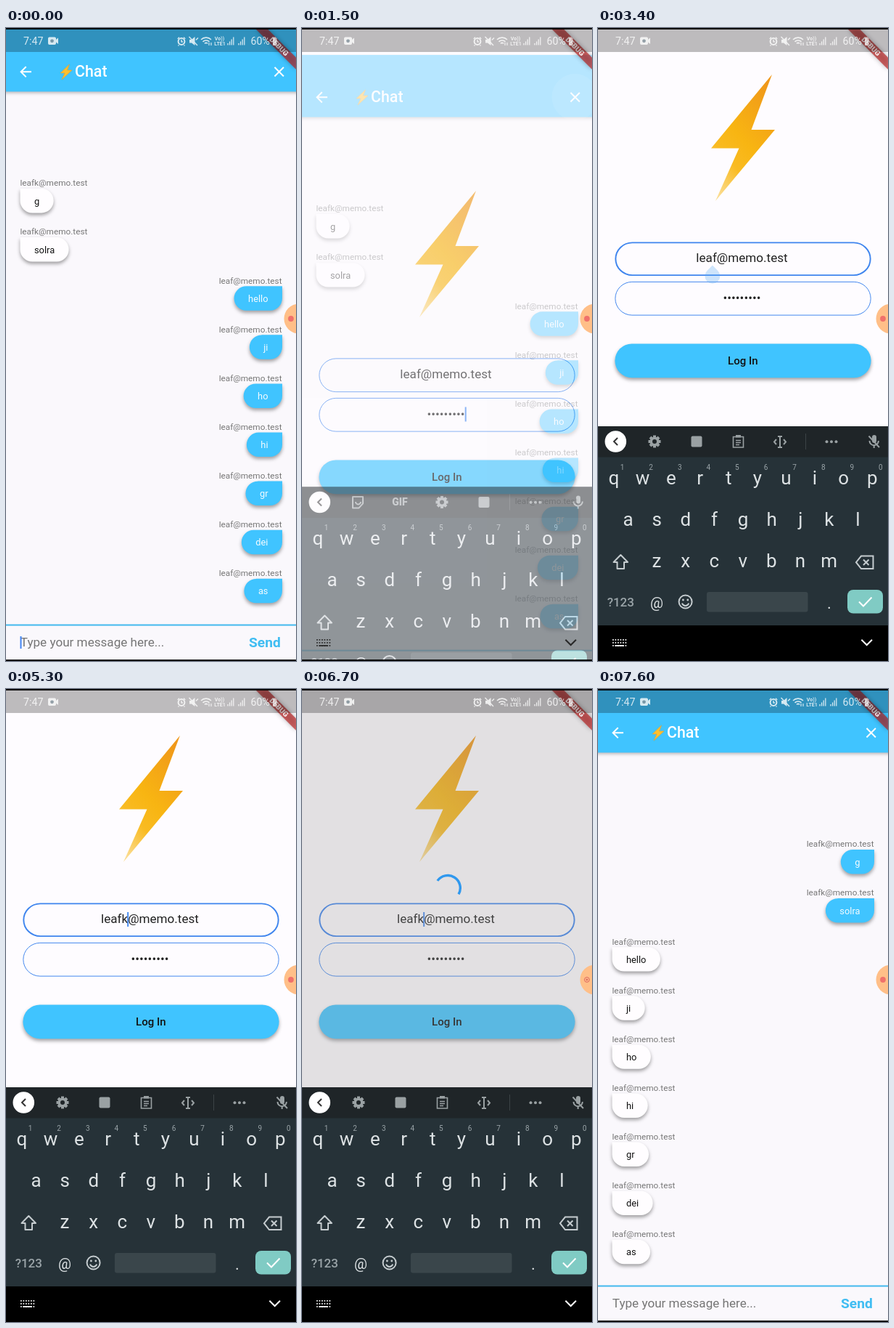
An HTML page for the animation above (8000 ms loop, 400 px wide and 871 px high).

```html
<!DOCTYPE html>
<html lang="en">
<head>
<meta charset="utf-8">
<title>Chat login</title>
<style>
html, body { margin: 0; height: 100%; overflow: hidden; background: #000; }
svg { display: block; width: 100vw; height: 100vh; font-family: Roboto, sans-serif; }
.drop { filter: drop-shadow(0 3.5px 2.8px rgba(0,0,0,.36)); }
.bar { filter: drop-shadow(0 2px 2px rgba(0,0,0,.26)); }
.line { fill: none; stroke-width: 2; }
</style>
</head>
<body>
<svg id="stage" viewBox="0 0 400 871" xmlns="http://www.w3.org/2000/svg"></svg>
<script>
const LOOP = 8000, BLUE = '#40c4ff', EDGE = '#3f85ee';
const USER_A = 'leaf@memo.test', USER_B = 'leafk@memo.test';
const MESSAGES = ['g', 'solra', 'hello', 'ji', 'ho', 'hi', 'gr', 'dei', 'as'];
const BOLT = '240,64 156,165.5 194.5,165.5 162,238 244,140 211.5,140';
const PILL = { x: 23.35, w: 353.3, h: 46.7 };

const $ = id => document.getElementById(id);
const clamp = v => Math.max(0, Math.min(1, v));
const ramp = (t, from, to) => clamp((t - from) / (to - from));
const within = (t, a, b) => t >= a && t < b;
const set = (id, attr, value) => $(id).setAttribute(attr, value);
const show = (id, on) => set(id, 'visibility', on ? 'inherit' : 'hidden');

const pen = document.createElement('canvas').getContext('2d');
function textWidth(s, size) {
  pen.font = `${size}px Roboto, sans-serif`;
  return pen.measureText(s).width;
}

function bezier(x1, y1, x2, y2) {
  const at = (a, b, s) => 3 * a * s * (1 - s) ** 2 + 3 * b * s * s * (1 - s) + s ** 3;
  return x => {
    let lo = 0, hi = 1;
    for (let i = 0; i < 22; i++) {
      const mid = (lo + hi) / 2;
      if (at(x1, x2, mid) < x) lo = mid; else hi = mid;
    }
    return at(y1, y2, (lo + hi) / 2);
  };
}
const easeIn = bezier(.42, 0, 1, 1), slowIn = bezier(.4, 0, .2, 1);

const text = (x, y, s, size, attrs = '') => `<text x="${x}" y="${y}" font-size="${size}" ${attrs}>${s}</text>`;
const rect = (x, y, w, h, fill, attrs = '') => `<rect x="${x}" y="${y}" width="${w}" height="${h}" fill="${fill}" ${attrs}/>`;
const path = (d, stroke, attrs = '') => `<path class="line" d="${d}" stroke="${stroke}" ${attrs}/>`;
const group = (id, body, attrs = '') => `<g id="${id}" ${attrs}>${body}</g>`;
const mid = 'text-anchor="middle"';

function bubble(s, i, own, name) {
  const top = 221 + 67.1 * i, w = textWidth(s, 12.84) + 39, h = 33.5, r = 16.7;
  const x = own ? 381 - w : 19.5;
  const shape = own
    ? `M${x + r} ${top}H381V${top + h - r}a${r} ${r} 0 0 1 ${-r} ${r}H${x + r}a${r} ${r} 0 0 1 0 ${-2 * r}Z`
    : `M${x} ${top}H${x + w - r}a${r} ${r} 0 0 1 0 ${2 * r}H${x + r}a${r} ${r} 0 0 1 ${-r} ${-r}Z`;
  return text(own ? 380.5 : 19.5, top - 3.7, name, 11.77, `fill="#777" text-anchor="${own ? 'end' : 'start'}"`) +
    `<path class="drop" d="${shape}" fill="${own ? BLUE : '#fffdff'}"/>` +
    text(x + 19.5, top + 21.5, s, 12.84, `fill="${own ? '#f4fbff' : '#111'}"`);
}

function chatPage(id, me) {
  const rows = MESSAGES.map((s, i) => {
    const name = i < 2 ? USER_B : USER_A;
    return bubble(s, i, name === me, name);
  }).join('');
  return group(id,
    rect(0, 2, 400, 867, '#faf8fc') + rows +
    rect(-10, 2, 420, 85.5, BLUE, 'class="bar"') +
    path('M35 60.3H21M27.7 53.2L20.6 60.3L27.7 67.4', '#fff') +
    '<polygon points="87.5,50 75,62 81,62 77,71 91,58 84.5,58" fill="#fdc02f" stroke="#e59a2c" stroke-width=".6"/>' +
    text(95, 67.3, 'Chat', 21.4, 'font-weight="500" fill="#fff"') +
    path('M370.5 54L383 66.5M383 54L370.5 66.5', '#fff') +
    `<circle id="${id}Tap" cx="376.5" cy="60" fill="#fff"/>` +
    rect(0, 820.5, 400, 2, '#43b9ee') +
    text(19.8, 851, 'Type your message here...', 17.12, 'fill="#757575"') +
    text(335, 852, 'Send', 19.26, 'font-weight="700" fill="#40bdf2"') +
    rect(19.5, 837, 2, 17, '#4285f4', `id="${id}Caret"`));
}

const field = id => rect(0, 0, 0, 0, 'none', `id="${id}" rx="23" stroke="${EDGE}"`);
const handle = id => `<path id="${id}" d="M0 0L7.4 7.4A10.5 10.5 0 1 1 -7.4 7.4Z" fill="#5aaaf2"/>`;

const login = rect(0, 2, 400, 867, '#fefcff') + group('form',
  `<polygon points="${BOLT}" fill="url(#gold)"/>` +
  field('mailBox') + field('passBox') +
  text(198.5, 322, USER_A, 17.12, `id="mail" fill="#212121" ${mid}`) +
  text(198.5, 376.7, '•'.repeat(9), 17.12, `fill="#212121" ${mid}`) +
  rect(0, 307, 2, 20, '#4a8cf0', 'id="mailCaret"') +
  rect(224.7, 361.5, 2, 20, '#4a8cf0', 'id="passCaret"') +
  rect(PILL.x, 434.5, PILL.w, PILL.h, BLUE, 'rx="23.35" class="drop"') +
  '<g clip-path="url(#button)"><circle id="press" cx="200" cy="458" fill="#fff"/></g>' +
  text(199.8, 463.2, 'Log In', 15, `font-weight="500" fill="#111" ${mid}`) +
  handle('mailHandle') + handle('passHandle')) +
  rect(0, 2, 400, 867, '#969696', 'id="barrier"') +
  path('', '#2f98ee', 'id="spinner" style="stroke-width:3.4"');

const INK = '#9aa1a3';
const keys = (row, x, y) => [...row].map((c, i) => text(x + 39.6 * i, y, c, 26, mid)).join('');
const gear = x => Array.from({ length: 8 }, (_, i) =>
  rect(x - 2, 560.5, 4, 5, INK, `transform="rotate(${i * 45} ${x} 569)"`)).join('') +
  `<circle cx="${x}" cy="569" r="4.8" fill="none" stroke="${INK}" stroke-width="3.6"/>`;
const translate = x => rect(x - 7.5, 561.5, 15, 15, INK, 'rx="2"');
const mic = rect(378, 560, 6, 11, INK, 'rx="3"') + path('M374.5 568a6.2 6.2 0 0 0 12.4 0M380.7 574.5V578', INK);

const toolsA = path('M70 561.5H84V571L78.5 577H70Z', INK, 'stroke-linejoin="round"') +
  path('M74 568.5a3.5 3.5 0 0 0 7 0', INK) +
  text(135, 574, 'GIF', 14, `font-weight="900" fill="${INK}" ${mid}`) + gear(193) + translate(251);
const toolsB = gear(78) + translate(136) +
  path('M186.5 562.5H200.5V577H186.5ZM190 567.5H197M190 570.5H197M190 573.5H195', INK, 'style="stroke-width:1.6"') +
  rect(190, 560, 7, 3.5, INK) +
  path('M251 562V577M248 562H254M248 577H254M246 566L243 569.5L246 573M256 566L259 569.5L256 573', INK) +
  path('M373.5 561.5L388 577', INK);
const tools = '<circle cx="24.3" cy="569" r="14.8" fill="#fff"/>' +
  path('M27 564L22 569L27 574', '#333') +
  group('toolsA', toolsA) + group('toolsB', toolsB) +
  rect(286, 558, 1, 22, '#3c4346') +
  [315.5, 322, 328.5].map(x => `<circle cx="${x}" cy="569.3" r="2" fill="${INK}"/>`).join('') + mic;

const digits = '1234567890';
const row = (size, dx, y, fill) => [...digits].map((c, i) =>
  text(21.5 + dx + 39.6 * i, y, c, size, `fill="${fill}" ${mid}`)).join('');

const keyboard = rect(0, 548, 400, 330, '#263238') + rect(0, 548, 400, 42.5, '#1f2528') +
  `<g fill="#dde2e4">${keys('qwertyuiop', 21.8, 627.5)}${keys('asdfghjkl', 41.7, 685)}${keys('zxcvbnm', 81, 742)}</g>` +
  path('M31.3 725L21.5 735H26.5V744H36V735H41Z', '#c5cccf', 'stroke-linejoin="round"') +
  path('M363 726.5H379.5V744H363L356 735.2ZM366 731.5L373.5 739M373.5 731.5L366 739', '#c5cccf') +
  text(31.3, 796, '?123', 17, `font-weight="500" fill="#9aa4a8" ${mid}`) +
  text(319, 799, '.', 22, `fill="#dde2e4" ${mid}`) +
  rect(344, 773, 49, 32.5, '#80cbc4', 'rx="8"') + path('M360 789.5L366 795.5L377.5 783.5', '#fff') +
  group('mailKeys', tools + row(10, 12, 608, '#9aa4a8') +
    text(81, 797.5, '@', 20, `fill="#dde2e4" ${mid}`) +
    '<circle cx="120.6" cy="789.5" r="9" class="line" stroke="#c5cccf"/>' +
    '<circle cx="117.4" cy="787" r="1.4" fill="#c5cccf"/><circle cx="123.8" cy="787" r="1.4" fill="#c5cccf"/>' +
    path('M116 791.5a4.8 4.8 0 0 0 9.2 0', '#c5cccf') +
    rect(150, 776, 139.5, 27.5, '#3a464b', 'rx="3"')) +
  group('passKeys', row(22.5, 0, 578, '#dde2e4') +
    text(81, 798, ',', 22, `fill="#dde2e4" ${mid}`) + rect(110, 776, 179.5, 27.5, '#3a464b', 'rx="3"'));

let navDots = '';
for (let i = 0; i < 18; i++) {
  navDots += `<rect x="${20 + (i % 6) * 3.5}" y="${841 + Math.floor(i / 6) * 4}" width="1.7" height="1.7"/>`;
}
const nav = rect(0, 822, 400, 47, '#000', 'id="navBack"') +
  `<g id="navInk">${navDots}<rect x="23.5" y="849" width="12.2" height="1.7"/></g>` +
  path('M363.4 841.8L370.7 849L378 841.8', '#000', 'id="chevron"');

const bars = x => path(`M${x} 23.5V21M${x + 2.6} 23.5V18.5M${x + 5.2} 23.5V15.5M${x + 7.8} 23.5V12.5`, '#fff', 'style="stroke-width:1.3"');
const status = rect(0, 2, 400, 31, '#000', 'opacity=".26"') +
  `<g fill="#fff" opacity=".8">${text(24, 23, '7:47', 14.2)}
  <path d="M60 12.5H67a2 2 0 0 1 2 2V16L72 13.5V22L69 19.6V21a2 2 0 0 1-2 2H60a2 2 0 0 1-2-2V14.5a2 2 0 0 1 2-2Z"/>
  <circle cx="63.5" cy="17.8" r="2.4" fill="#8a9aa3"/>
  <circle cx="242" cy="18.5" r="4.4" class="line" stroke="#fff"/>
  ${path('M242 16V19H244M236.8 15L239 12.8M247.2 15L245 12.8M238.5 23.5L237.5 24.5M245.5 23.5L246.5 24.5', '#fff', 'style="stroke-width:1.4"')}
  <path d="M253 16H256L260.5 12V24L256 20.5H253Z"/>
  ${path('M252.5 12L264 24M262 16.5L265 13.5', '#fff', 'style="stroke-width:1.4"')}
  ${path('M269 16a10 10 0 0 1 14 0M271.5 18.8a6.5 6.5 0 0 1 9 0M274 21.3a3 3 0 0 1 4 0', '#fff', 'style="stroke-width:1.6"')}
  ${path('M280 20V24M283 24V20', '#fff', 'style="stroke-width:1.2"')}
  ${text(294.5, 16.8, 'Vo))', 7, `font-weight="700" ${mid}`)}${text(295, 24, 'LTE1', 7, `font-weight="700" ${mid}`)}
  ${bars(306)}${bars(321)}
  ${text(337.5, 23, '60%', 14.2)}<path d="M368 13.5H369.5V12.5H372V13.5H373.5V24H368Z" opacity=".8"/></g>`;

const ribbon = '<path d="M345 2H361.5L400 40.5V57Z" fill="#b71c1c" fill-opacity=".66" style="filter:drop-shadow(0 0 3px rgba(0,0,0,.45))"/>' +
  text(0, 3.6, 'DEBUG', 10, `font-weight="900" fill="#fff" fill-opacity=".9" ${mid} transform="translate(376.7 25.3) rotate(45)"`);

const recorder = '<circle cx="404" cy="400" r="20.5" fill="#ffbf88"/>' +
  '<circle id="recDot" cx="393" cy="400" r="3.9" fill="#f0716b"/>' +
  '<g id="recRing" fill="none" stroke="#dd6660"><circle cx="393" cy="400" r="3.4"/><circle cx="393" cy="400" r="1" fill="#dd6660"/></g>';

$('stage').innerHTML = `<defs>
  <linearGradient id="gold" x1=".75" y1="0" x2=".2" y2="1">
    <stop offset="0" stop-color="#f0981a"/><stop offset=".5" stop-color="#f8b512"/>
    <stop offset=".72" stop-color="#f9bb22"/><stop offset="1" stop-color="#fbdc92"/>
  </linearGradient>
  <clipPath id="button">${rect(PILL.x, 434.5, PILL.w, PILL.h, '#000', 'rx="23.35"')}</clipPath>
  </defs>` +
  login + chatPage('chatA', USER_A) + chatPage('chatB', USER_B) + ribbon +
  group('keyboard', keyboard) + group('nav', nav) + status + recorder +
  rect(0, 0, 400, 2, '#000') + rect(0, 869, 400, 2, '#000');

function placePage(id, u) {
  show(id, u > 0);
  set(id, 'opacity', easeIn(u));
  set(id, 'transform', `translate(0 ${216.75 * (1 - slowIn(u))})`);
}

function caretX(name, count) {
  return 198.5 - textWidth(name, 17.12) / 2 + textWidth(name.slice(0, count), 17.12);
}

function placeHandle(id, x, y, alpha) {
  set(id, 'transform', `translate(${x} ${y})`);
  set(id, 'opacity', alpha);
}

// The border grows inwards; its outer edge stays put.
function drawBorder(id, top, focused) {
  const line = focused ? 1.95 : .97;
  set(id, 'x', PILL.x + line / 2);
  set(id, 'y', top + line / 2);
  set(id, 'width', PILL.w - line);
  set(id, 'height', PILL.h - line);
  set(id, 'stroke-width', line);
}

function drawSpinner(t) {
  const at = Math.min(t, 6700) - 6700;
  const end = 30 + at * .42, sweep = 175 - 100 * (1 - Math.cos(at / 210)) / 2;
  const point = a => `${201 + 17.3 * Math.cos(a * Math.PI / 180)} ${273.8 + 17.3 * Math.sin(a * Math.PI / 180)}`;
  set('spinner', 'd', `M${point(end - sweep)}A17.3 17.3 0 0 1 ${point(end)}`);
  show('spinner', within(t, 6250, 6950));
}

function drawForm(t) {
  const raised = within(t, 1600, 7050);
  set('form', 'transform', `translate(0 ${raised ? 0 : 160})`);
  drawBorder('mailBox', 294.4, within(t, 2800, 7000));
  drawBorder('passBox', 348.9, within(t, 1600, 2800));

  const name = t >= 5100 ? USER_B : USER_A;
  const spot = t < 4400 ? 3 : t < 5100 ? 4 : 5;
  const x = caretX(name, spot);
  $('mail').textContent = name;
  set('mailCaret', 'x', x - 1);
  show('mailCaret', within(t, 3000, 3400) || within(t, 3600, 4100) || within(t, 4400, 5600) || within(t, 6100, 7000));
  show('passCaret', within(t, 1300, 1900) || within(t, 2400, 2800));
  placeHandle('mailHandle', x, 326.5, within(t, 3360, 5100) ? ramp(t, 3360, 3500) : 0);
  placeHandle('passHandle', 224.5, 381, within(t, 2100, 2800) ? ramp(t, 2060, 2200) : 0);

  set('press', 'r', 20 + 165 * ramp(t, 5800, 6300));
  set('press', 'opacity', t < 5800 ? 0 : .16 * (1 - ramp(t, 6250, 6750)));
  set('barrier', 'opacity', .28 * (ramp(t, 6200, 6400) - ramp(t, 6900, 7050)));
  drawSpinner(t);
}

function drawKeyboard(t) {
  const up = ramp(t, 1350, 1650) - ramp(t, 6900, 7120);
  const solid = clamp(up * 2.5 - 1.5), tone = Math.round(40 + 215 * solid);
  const ink = `rgb(${tone},${tone},${tone})`;
  set('keyboard', 'transform', `translate(0 ${168 * (1 - up)})`);
  set('keyboard', 'opacity', up);
  show('keyboard', up > 0);
  show('nav', up > 0);
  set('nav', 'opacity', clamp(up * 2));
  set('navBack', 'opacity', solid);
  set('navInk', 'fill', ink);
  set('chevron', 'stroke', ink);

  const numbers = within(t, 2100, 2850);
  show('passKeys', numbers);
  show('mailKeys', !numbers);
  show('toolsA', t < 2100);
  show('toolsB', t >= 2100);
}

function draw(t) {
  placePage('chatA', 1 - ramp(t, 1368, 1668));
  placePage('chatB', ramp(t, 6880, 7190));
  show('chatACaret', t < 500 || t >= 1000);
  show('chatBCaret', false);
  set('chatATap', 'r', 12 + 20 * ramp(t, 1000, 1250));
  set('chatATap', 'opacity', t < 1000 ? 0 : .18 * (1 - ramp(t, 1300, 1700)));
  drawForm(t);
  drawKeyboard(t);
  const ring = within(t, 6650, 6900);
  show('recRing', ring);
  show('recDot', !ring);
}

const start = performance.now();
function tick() {
  draw((performance.now() - start) % LOOP);
  requestAnimationFrame(tick);
}
tick();
</script>
</body>
</html>
```
